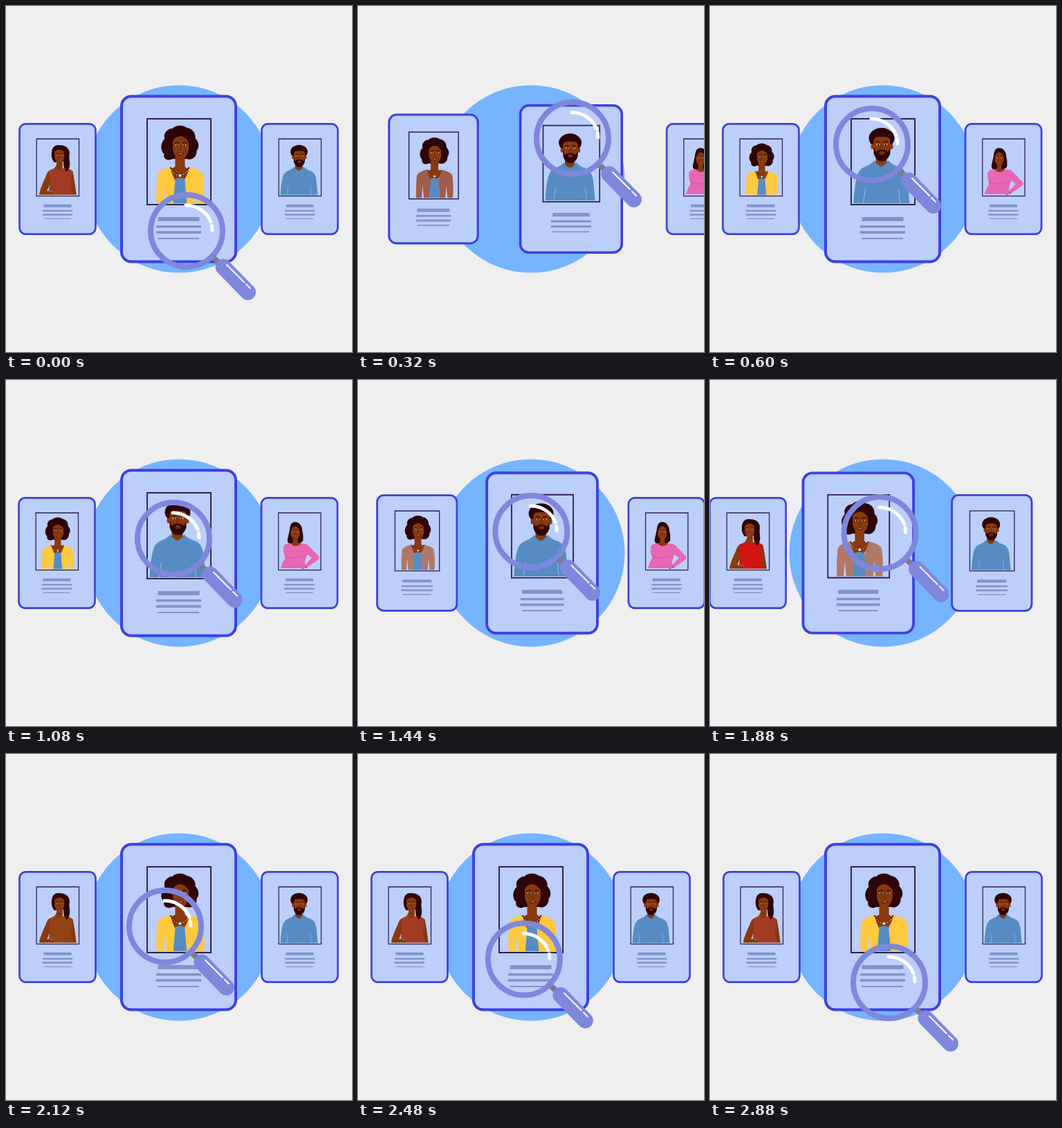
These frames come from a looping animation (500x500 px, 2.92 s). An HTML page with a canvas:

```html
<!DOCTYPE html>
<html lang="en">
<head>
<meta charset="utf-8">
<title>Candidate search</title>
<style>
html, body { margin: 0; width: 100%; height: 100%; overflow: hidden; background: #efefef; }
canvas { display: block; }
</style>
</head>
<body>
<canvas id="stage" width="500" height="500"></canvas>
<script>
const ctx = document.getElementById('stage').getContext('2d');
const LOOP = 2920, STEP = 40, SLIDE = 600, BACK = 1400;
const HAIR = '#2e0508', SKIN = '#88390d', SHADE = '#6b2708', BLUE = '#578cc3', PINK = '#e767b4';
const BAR = '#8094c9', LENS = '#7f87dc';

function shape(color, d, width) {
  const path = new Path2D(d);
  if (width) {
    ctx.strokeStyle = color;
    ctx.lineWidth = width;
    ctx.stroke(path);
  } else {
    ctx.fillStyle = color;
    ctx.fill(path);
  }
}

function ellipse(color, x, y, rx, ry) {
  ctx.fillStyle = color;
  ctx.beginPath();
  ctx.ellipse(x, y, rx, ry, 0, 0, 7);
  ctx.fill();
}

// Head centred on x, y; w is half the face width
function face(x, y, w, beard) {
  ctx.save();
  ctx.translate(x, y);
  ctx.scale(w / 12, w / 12);
  shape(SKIN, 'M-12 -10Q-10 -18 0 -18Q10 -18 12 -10V3Q10 11 4 17Q0 20 -4 17Q-10 11 -12 3Z');
  if (beard) {
    shape(HAIR, 'M-12 0L-9 7Q-5 3 0 4Q5 3 9 7L12 0V9Q9 18 3 20H-3Q-9 18 -12 9Z');
    shape(SKIN, 'M-4 7Q0 5 4 7L3 11H-3Z');
  }
  for (const side of [-1, 1]) {
    ellipse('#f4dfd2', side * 5.5, -4, 2.6, 1.2);
    ellipse('#180303', side * 5.3, -4, 1.2, 1.3);
    shape(HAIR, `M${side * 2.5} -7L${side * 6} -8.5L${side * 9} -7`, 1.3);
  }
  shape(SHADE, 'M0 -3L-2 3H2', 1);
  shape(beard ? SHADE : '#4a0a0c', 'M-4.5 9Q-2 7 0 8Q2 7 4.5 9Q0 13 -4.5 9Z');
  if (!beard) shape('#f1ddd5', 'M-2.5 9H2.5', 0.9);
  ctx.restore();
}

function womanWithBraid(dress) {
  shape(HAIR, 'M-13 -54C-13 -70 -4 -75 5 -73C18 -74 27 -65 26 -54C24 -44 28 -36 26 -27Q23 -15 16 -20Q12 -28 13 -38L-7 -36Q-14 -44 -13 -54Z');
  shape(SKIN, 'M-1 -38H11V-23Q26 -22 33 -17Q37 4 41 34H30L25 5L-14 6L-23 26Q-8 25 -5 34H-40Q-37 18 -26 -4Q-22 -19 -14 -20Q-3 -22 -1 -38Z');
  shape(dress, 'M-18 -18Q-8 -23 -4 -24Q5 -15 14 -24Q27 -22 32 -17L29 5L32 34H-5Q-8 25 -19 25L-16 4Z');
  shape(HAIR, 'M15 -40Q26 -38 25 -22L20 -16Q13 -22 15 -40Z');
  face(4, -48, 10.5);
  shape(HAIR, 'M-9 -54Q-3 -69 6 -67Q14 -65 16 -49L19 -60Q12 -73 1 -71Q-10 -68 -9 -54Z');
}

function womanInJacket(jacket) {
  shape(HAIR, 'M-20 -58C-23 -67 -15 -73 -9 -73C-4 -79 8 -78 12 -74C22 -73 25 -63 24 -59C31 -52 29 -44 26 -41C27 -32 18 -26 12 -29L-9 -29C-16 -25 -23 -30 -21 -36C-28 -43 -25 -54 -20 -58Z');
  shape(SKIN, 'M-5 -36H9V-18L16 -12L4 8H-6L-15 -12L-5 -18Z');
  shape(BLUE, 'M-6 0Q2 -3 9 0L12 35H-8Z');
  shape(jacket, 'M-13 -17L-5 3L-8 35H-32Q-33 15 -31 -5Q-30 -13 -13 -17ZM16 -17L9 3L12 35H36Q38 14 35 -6Q33 -13 16 -17Z');
  shape('#bccefa', 'M-20 12L-18 35H-22ZM24 12L26 35H22Z');
  shape('#6b1e08', 'M-12 -17Q-6 -6 2 -5Q10 -6 15 -17', 2.2);
  ctx.setLineDash([1.5, 2]);
  shape('#f2e4d4', 'M-11 -14Q-5 -5 2 -5Q9 -6 14 -14', 1.2);
  ctx.setLineDash([]);
  ellipse('#f7eadb', 2, -5, 1.7, 1.9);
  face(3, -45, 11.5);
  shape(HAIR, 'M-11 -47Q-10 -60 2 -62Q13 -61 16 -47L20 -58Q12 -71 1 -69Q-13 -68 -14 -56Z');
}

function man() {
  shape(SKIN, 'M-10 -36H6V-25L10 -20L-2 -10L-13 -20L-10 -25Z');
  shape(BLUE, 'M-12 -27Q-2 -10 8 -27Q14 -20 25 -17Q34 -13 36 2L39 35H-42Q-41 10 -37 -4Q-34 -15 -25 -18Q-15 -22 -12 -27Z');
  shape('#4d7db0', 'M-12 -25L-2 -16L8 -25', 1.2);
  shape('#9db9e5', 'M-25 14L-28 35M23 14L25 35', 1);
  ellipse(HAIR, -1.5, -59, 18.5, 15);
  ellipse(SKIN, -14.5, -47, 2.5, 4);
  ellipse(SKIN, 12.5, -47, 2.5, 4);
  face(-1, -46, 12, true);
  shape(HAIR, 'M-15 -50L-15 -64Q-2 -72 13 -64L13 -50Q11 -59 8 -60Q-1 -62 -10 -60Q-13 -58 -15 -50Z');
}

function womanInPink() {
  shape(HAIR, 'M-21 -51C-20 -63 -15 -68 -9 -67C1 -67 6 -57 6 -50Q9 -40 8 -27Q3 -20 -3 -21H-19Q-26 -20 -26 -29Q-23 -41 -21 -51Z');
  shape(SKIN, 'M-14 -34H-4V-23L4 -20L-8 -10L-19 -20L-14 -23Z');
  shape(SKIN, 'M2 29L14 26L16 32L6 35Z');
  shape(PINK, 'M-20 -21Q-8 -9 4 -21Q17 -20 21 -15L42 7Q45 11 40 15L16 32L12 26L27 11L17 3L12 18Q11 24 14 33H-41Q-37 20 -31 11Q-36 -5 -34 -15Q-31 -20 -20 -21Z');
  shape('#d052a0', 'M-28 8Q-10 16 15 4M-30 2L-27 14', 1.2);
  face(-9, -43, 10);
  shape(HAIR, 'M-19 -44Q-18 -56 -9 -59Q0 -56 2 -44L5 -52Q0 -65 -9 -65Q-18 -64 -21 -52Z');
}

function card(x, size, person, color) {
  ctx.save();
  ctx.translate(x, 250);
  ctx.scale(size, size);
  ctx.beginPath();
  ctx.roundRect(-82.5, -119.5, 165, 239, 14);
  ctx.fillStyle = '#bccefa';
  ctx.fill();
  ctx.strokeStyle = '#3e40df';
  ctx.lineWidth = 4;
  ctx.stroke();
  person(color);
  shape('#2b2152', 'M-45.5 -87H46.5V37H-45.5Z', 1.9);
  shape(BAR, 'M-30 55H30V61H-30ZM-32.5 67H32.5V70.5H-32.5ZM-32.5 75.3H32.5V79H-32.5ZM-30 85H29.5V87H-30Z');
  ctx.restore();
}

function magnifier([x, y]) {
  ctx.save();
  ctx.translate(x, y);
  shape('#7c7c86', 'M37 37L50 49', 8);
  shape(LENS, 'M52 0A52 52 0 1 1 -52 0A52 52 0 1 1 52 0Z', 8);
  ctx.lineCap = 'round';
  shape(LENS, 'M53 52L88.5 88.5', 23);
  shape('#fff', 'M-1 -37A38 38 0 0 1 35 -13M36.5 -7.5L37 -1', 5);
  shape('#fff', 'M58 49L83 74M86 77L92 83', 2);
  ctx.restore();
}

// Magnifier path: time, x, y
const keys = [
  [0, 261, 325], [320, 310, 191], [600, 234, 200], [1080, 242, 229],
  [1720, 254, 212], [2120, 230, 249], [2880, 259, 330]
];

function key(i) {
  const n = keys.length, turn = Math.floor(i / n), [t, x, y] = keys[i - turn * n];
  return [t + turn * LOOP, x, y];
}

// Tangent at a key, flat where the direction reverses
function slope(i, axis) {
  const a = key(i - 1), b = key(i), c = key(i + 1);
  return (b[axis] - a[axis]) * (c[axis] - b[axis]) <= 0 ? 0 : (c[axis] - a[axis]) / (c[0] - a[0]);
}

function lensAt(t) {
  const i = keys.findLastIndex(k => k[0] <= t);
  const a = key(i), b = key(i + 1), span = b[0] - a[0], s = (t - a[0]) / span;
  return [1, 2].map(axis => {
    const ease = s * s * (3 - 2 * s);
    return a[axis] + (b[axis] - a[axis]) * ease
      + span * s * (1 - s) * ((1 - s) * slope(i, axis) - s * slope(i + 1, axis));
  });
}

// 0 = first arrangement, 1 = cards moved one place left
function slideAt(t, power = 1.44) {
  if (t < SLIDE) return 1 - (1 - t / SLIDE) ** power;
  if (t < BACK) return 1;
  return t < BACK + SLIDE ? (1 - (t - BACK) / SLIDE) ** power : 0;
}

const mix = (a, b, p) => a + (b - a) * p;

function draw(t) {
  const p = slideAt(t), small = 2 / 3;
  const moving = p > 0.02 && p < 0.98;
  const dress = moving ? '#d01512' : t > 1900 && t < 2400 ? '#914313' : '#a13b23';
  const jacket = !moving ? '#ffc83d' : t < BACK ? '#a05c4b' : '#b07868';
  ctx.fillStyle = '#efefef';
  ctx.fillRect(0, 0, 500, 500);
  ellipse('#76b4ff', 250, 250, 135.5, 135.5);
  card(mix(74.5, -127, p), small, womanWithBraid, dress);
  card(mix(249.5, 73.5, slideAt(t, t < BACK ? 2.1 : 1)), mix(1, small, p), womanInJacket, jacket);
  card(mix(424.5, 249.5, p), mix(small, 1, p), man);
  card(mix(655, 424, p), small, womanInPink);
  magnifier(lensAt(t));
}

const start = performance.now();
function tick() {
  const t = (performance.now() - start) % LOOP;
  draw(Math.floor(t / STEP) * STEP);
  requestAnimationFrame(tick);
}
tick();
</script>
</body>
</html>
```
